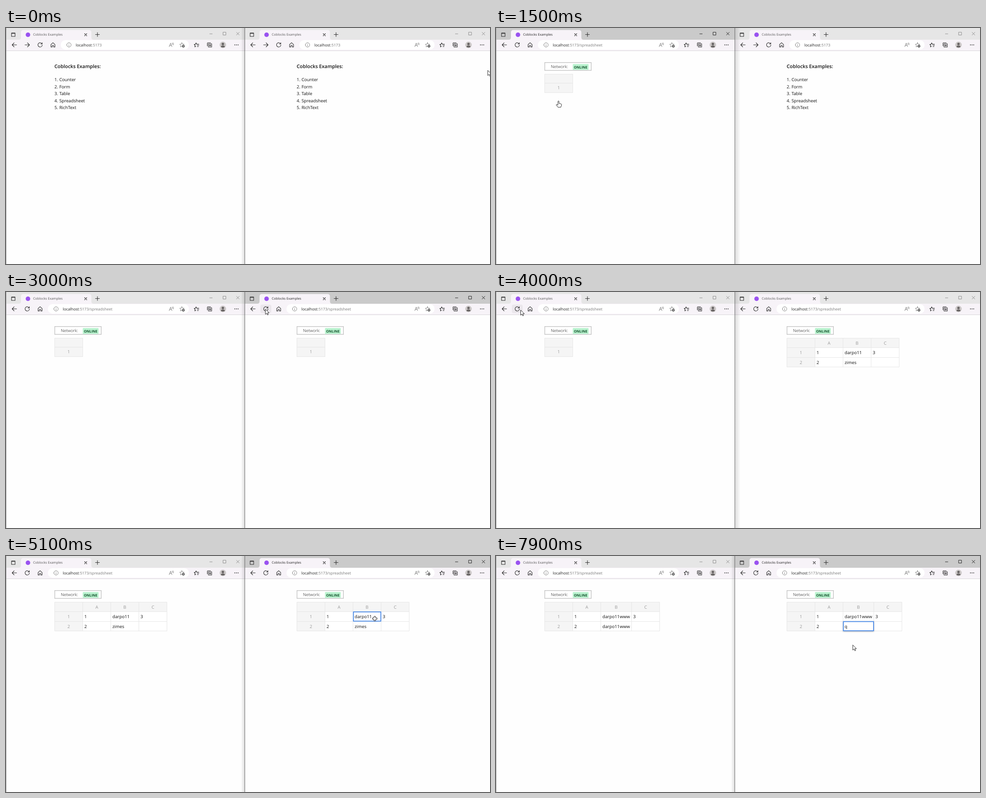
Animation of 1069x524 px, one loop 8 s. Source, as an HTML page:

```html
<!DOCTYPE html>
<html lang="en">
<head>
<meta charset="utf-8">
<title>Coblocks Examples</title>
<style>
html, body { margin: 0; width: 100%; height: 100%; overflow: hidden; background: #fefefe; }
svg { display: block; width: 1069px; height: 524px; }
text { font: 9.7px "Open Sans", "Noto Sans", sans-serif; fill: #111; text-rendering: geometricPrecision; white-space: pre; }
.bar { fill: #e6e6e6; }
.active .bar { fill: #cacaca; }
.ctl { fill: none; stroke: #858585; stroke-width: .9; }
.active .ctl { stroke: #111; }
.tab { fill: #f7f3f8; }
text.small { font-size: 7.3px; fill: #555; }
.active text.small { fill: #222; }
text.url { font-size: 8.5px; fill: #777; }
.url tspan { fill: #1c1c1c; }
text.title { font-size: 10.85px; font-weight: 600; }
text.net { font-size: 9.4px; font-weight: 300; }
text.badge { font-size: 7.7px; font-weight: 700; fill: #14532d; }
text.head { fill: #999; text-anchor: middle; }
.icon { fill: none; stroke: #2b2b2b; stroke-width: 1.1; stroke-linecap: round; stroke-linejoin: round; }
.soft { stroke: #777; stroke-width: .9; }
.grid { fill: none; stroke: #e6e6e6; }
.pick { fill: none; stroke: #3c82e6; stroke-width: 1.7; }
.edit { fill: #fff; filter: drop-shadow(0 1px 1.5px rgba(0,0,0,.35)); }
.caret { fill: #111; }
.pointer { fill: #fff; stroke: #111; stroke-width: .9; stroke-linejoin: round; }
</style>
</head>
<body>
<svg id="stage" viewBox="0 0 1069 524"></svg>
<script>
const LOOP = 8000;
const USER = 'darpo11', LONG = USER + 'www', OTHER = 'zimes';
const stage = document.getElementById('stage');

// "a-b c-d" lists the spans of time in ms during which a group shows
const show = (spans, body) => `<g data-on="${spans}">${body}</g>`;
const move = (x, y, body) => `<g transform="translate(${x} ${y})">${body}</g>`;
const path = (d, cls = 'icon') => `<path class="${cls}" d="${d}"/>`;
const box = (x, y, w, h, more = '') => `<rect x="${x}" y="${y}" width="${w}" height="${h}" ${more}/>`;
const text = (x, y, s, cls = '') => `<text x="${x}" y="${y}" class="${cls}">${s}</text>`;

const STAR = 'M0 -5L1.5 -1.7L5 -1.3L2.4 1.1L3.1 4.6L0 2.8L-3.1 4.6L-2.4 1.1L-5 -1.3L-1.5 -1.7Z';
const icons = {
  back: path('M5 0H-5M-.5 -4.5L-5 0L-.5 4.5'),
  forward: path('M-5 0H5M.5 -4.5L5 0L.5 4.5'),
  reload: path('M4.3 -2.2A4.8 4.8 0 1 0 4.8 .4M4.6 -5V-2H1.6'),
  home: path('M-4.4 -.8L0 -4.8L4.4 -.8V4.6H1.5V1.2H-1.5V4.6H-4.4Z'),
  info: path('M-4.8 0A4.8 4.8 0 1 0 4.8 0A4.8 4.8 0 1 0 -4.8 0M0 -.3V2.4M0 -2.3V-2.2', 'icon soft'),
  read: path('M-4.6 4L-1.5 -4L1.6 4M-3.5 1.2H.5M2 -4Q3.2 -2.5 2.4 -.8M4 -4.8Q6 -2.4 4.6 .2', 'icon soft'),
  addStar: path(STAR, 'icon soft') + '<circle cx="3.2" cy="2.8" r="2.9" fill="#444"/>' +
    '<path d="M1.5 2.8H4.9M3.2 1.1V4.5" stroke="#fff" stroke-width=".8"/>',
  favorites: path('M-1.8 3.2L-4 4.4L-3.4 1L-5.4 -1L-2.7 -1.4L-1.2 -4.4L.3 -1.4H5M1.5 1.2H5M1.5 3.8H4'),
  collect: path('M-2.5 -2.5H4.8V4.8H-2.5ZM-4.8 2.2V-3.6Q-4.8 -4.8 -3.6 -4.8H2.4M1.2 -.9V3.2M-.9 1.1H3.2'),
  avatar: '<circle r="7.2" fill="#cdc9c9"/><circle cy="-2" r="2.7" fill="#696565"/>' +
    '<path d="M-4.4 4.7Q-4.4 1.3 0 1.3T4.4 4.7Q0 7 -4.4 4.7Z" fill="#696565"/>',
  more: [-3.6, 0, 3.6].map(x => `<circle cx="${x}" r=".95" fill="#222"/>`).join('')
};
const icon = (name, x) => move(x, 37.5, icons[name]);

const HOST = '<tspan>localhost</tspan>:5173';

// l shifts the left-aligned parts, r the right-aligned ones, p the page
function browser({ l, r, p, width, active, open, hover, load, page }) {
  const address = (x, url) =>
    box(l + x - 18, 27, 301 + r - l - (x - 121), 21, 'rx="10" fill="#fff"') +
    icon('info', l + x) + text(l + x + 15, 40.6, url, 'url');
  const items = ['Counter', 'Form', 'Table', 'Spreadsheet', 'RichText'];
  const home = ['back', 'forward', 'reload', 'home'].map((n, i) => icon(n, l + 18.5 + i * 28.4)).join('') +
    address(139, HOST) +
    text(p + 107, 89, 'Coblocks Examples:', 'title') +
    items.map((s, i) => text(p + 107, 118.2 + i * 15.5, `${i + 1}. ${s}`)).join('');
  const sheet = show(hover, box(l + 35, 28, 24, 19, 'rx="4" fill="#ebe7ec"')) +
    ['back', 'reload', 'home'].map((n, i) => icon(n, l + 18.5 + i * 28.4)).join('') +
    address(110.5, HOST + '/spreadsheet') +
    box(p + 107.7, 76.7, 102.6, 17.4, 'fill="#fff" stroke="#c2c2c2" stroke-width="1.4"') +
    text(p + 121, 89, 'Network:', 'net') +
    box(p + 169.5, 80, 35, 13, 'rx="1.5" fill="#bbf3d0"') + text(p + 172, 89.6, 'ONLINE', 'badge') +
    show(`${open}-${load}`, move(p, 0,
      box(107.5, 102.5, 62, 41, 'fill="#f5f5f5" stroke="#e6e6e6"') +
      path('M107.5 122.5H169.5', 'grid') + text(138.5, 136.3, 1, 'head'))) +
    show(`${load}-${LOOP}`, move(p, 0, page));
  const tabs = path(`M28 26q5 0 5 -5V10q0 -5.5 5.5 -5.5H183q5.5 0 5.5 5.5V21q0 5 5 5Z`, 'tab') +
    path('M12.2 11H20V18.8H12.2ZM12.2 12H20') +
    '<circle cx="48.5" cy="15" r="5" fill="#9a52f0"/>' +
    text(60, 17.4, 'Coblocks Examples', 'small') +
    path('M173.5 12.5L178.5 17.5M178.5 12.5L173.5 17.5') + path('M197.5 14.5H206.5M202 10V19');
  return `<g data-active="${active}">` +
    box(l, 0, width, 26, 'class="bar"') +
    move(r, 0, path('M449.5 13H456M479.3 9.3H485.7V15.7H479.3ZM508.7 9.2L515.5 16M515.5 9.2L508.7 16', 'ctl')) +
    box(l, 26, width, 24, 'class="tab"') + box(l, 50, width, 1, 'fill="#d9d5da"') +
    move(l, 0, tabs) +
    show(`0-${open}`, home) + show(`${open}-${LOOP}`, sheet) +
    [['read', 365], ['addStar', 388.5], ['favorites', 421], ['collect', 449.5], ['avatar', 479], ['more', 509]]
      .map(([n, x]) => icon(n, r + x)).join('') + '</g>';
}

// the grid with column B of width b
function grid(b) {
  const x = [107.5, 169.5, 231.5, 231.5 + b, 293.5 + b], y = [102.5, 123.5, 145.5, 166.5], end = x[4];
  return box(107.5, 102.5, end - 107.5, 64, 'fill="#fff"') +
    box(107.5, 102.5, end - 107.5, 21, 'fill="#f5f5f5"') + box(107.5, 102.5, 62, 64, 'fill="#f5f5f5"') +
    path(x.map(v => `M${v} 102.5V166.5`).join('') + y.map(v => `M107.5 ${v}H${end}`).join(''), 'grid') +
    [...'ABC'].map((c, i) => text((x[i + 1] + (x[i + 2] || end)) / 2, 117, c, 'head')).join('') +
    [1, 2].map(n => text(138.5, 117 + n * 21.3, n, 'head') + text(173, 117 + n * 21.3, n)).join('') +
    text(x[3] + 3.5, 138.3, 3);
}
const cellB = (row, s) => text(235, 117 + row * 21.3, s);
const pick = (row, w) => box(232.3, 102.8 + row * 21.4, w - 1.4, 20.4, 'class="pick"');
const edit = (row, w) => box(231.5, 102 + row * 21.4, w, 22, 'class="edit"') + pick(row, w);
const caret = (x, y) => box(x, y, 1, 14, 'class="caret"');

const leftPage =
  show('0-6200', grid(62) + cellB(1, USER)) +
  show('6200-8000', grid(68) + cellB(1, LONG)) +
  show('0-7000', cellB(2, OTHER)) + show('7000-8000', cellB(2, LONG));

const rightPage =
  show('0-6100', grid(62)) + show('6100-8000', grid(68)) +
  show('5000-5300', pick(1, 62)) + show('5300-6100', edit(1, 62)) +
  show('0-5600', cellB(1, USER)) + show('5600-5800', cellB(1, USER + 'w')) +
  show('5800-5900', cellB(1, USER + 'ww')) + show('5900-8000', cellB(1, LONG)) +
  show('5300-5600', caret(274, 127)) + show('5600-5800', caret(281.5, 127)) +
  show('0-6900', cellB(2, OTHER)) + show('6900-7200', cellB(2, LONG)) +
  show('6100-7200', pick(2, 68)) + show('7200-8000', edit(2, 68) + cellB(2, 'q')) +
  show('7400-7900', caret(242, 148));

const pointers = {
  arrow: path('M0 0V11.5L2.7 9L4.6 13L6.4 12.2L4.6 8.3H8.2Z', 'pointer'),
  hand: path('M-1.2 1.2a1.2 1.2 0 0 1 2.4 0V5.5l4.2 .9q1.6 .4 1.4 2L6 11.5L5 14H-1L-4.8 9.3q-.6 -1.4 1 -1.5L-1.2 9.2Z', 'pointer'),
  cross: path('M-1.7 -5H1.7V-1.7H5V1.7H1.7V5H-1.7V1.7H-5V-1.7H-1.7Z', 'pointer'),
  beam: path('M-2 -6.5H2M0 -6.5V6.5M-2 6.5H2', 'pointer'),
  none: ''
};
// pointer track: start in tenths of a second, shape, x, y
const track = [
  [0, 'arrow', 1064, 94], [1, 'arrow', 986, 140], [2, 'arrow', 946, 156], [3, 'arrow', 871, 184],
  [4, 'arrow', 741, 192], [5, 'arrow', 616, 185], [6, 'arrow', 316, 183], [7, 'arrow', 183, 177],
  [8, 'hand', 138, 162], [16, 'arrow', 135, 163], [17, 'arrow', 183, 170], [18, 'arrow', 443, 166],
  [19, 'arrow', 713, 168], [20, 'hand', 684, 159], [25, 'arrow', 682, 160], [26, 'arrow', 660, 176],
  [27, 'arrow', 630, 82], [28, 'arrow', 590, 52], [29, 'arrow', 573, 38], [35, 'arrow', 560, 55],
  [36, 'arrow', 292, 88], [37, 'arrow', 72, 70], [38, 'arrow', 58, 62], [39, 'arrow', 54.5, 40],
  [45, 'arrow', 120, 62], [46, 'arrow', 486, 131], [47, 'arrow', 848, 176], [48, 'cross', 814.5, 139],
  [53, 'none', 0, 0], [63, 'cross', 810, 157], [72, 'beam', 811, 157], [79, 'arrow', 788, 197.5]
];

const fade = (id, x1, x2) => `<linearGradient id="${id}" x1="${x1}" x2="${x2}">` +
  '<stop stop-opacity=".13"/><stop offset="1" stop-opacity="0"/></linearGradient>';

stage.innerHTML = '<defs>' + fade('toLeft', 1, 0) + fade('toRight', 0, 1) + '</defs>' +
  box(0, 0, 1069, 524, 'fill="#fefefe"') +
  browser({ l: 0, r: 0, p: 0, width: 528, active: '1300-2300 4100-4900',
    open: 1400, hover: '4000-4500', load: 4300, page: leftPage }) +
  browser({ l: 527, r: 542.5, p: 535, width: 542, active: '2300-4000 4900-8000',
    open: 2400, hover: '2900-3500', load: 3300, page: rightPage }) +
  show('1000-1400', box(-.5, 511.5, 102.5, 14, 'fill="#e9e9e9" stroke="#d2d2d2"') +
    text(4, 521.4, 'localhost:5173/spreadsheet', 'small')) +
  show('0-1300 2300-4000 4900-8000', box(519, 0, 8, 524, 'fill="url(#toLeft)"')) +
  show('1300-2300 4000-4900', box(528, 0, 12, 524, 'fill="url(#toRight)"')) +
  box(0, 0, 1, 524, 'fill="#a8a8a8"') + box(527, 0, 1, 524, 'fill="#6a6a6a"') +
  '<g id="pointer"></g>';

const timed = key => [...stage.querySelectorAll(`[data-${key}]`)].map(el =>
  ({ el, spans: el.dataset[key].split(' ').map(s => s.split('-').map(Number)) }));
const shown = timed('on'), windows = timed('active');
const pointer = document.getElementById('pointer');
const within = (spans, t) => spans.some(([a, b]) => t >= a && t < b);
let shape;

function render(t) {
  for (const { el, spans } of shown) el.style.display = within(spans, t) ? '' : 'none';
  for (const { el, spans } of windows) el.classList.toggle('active', within(spans, t));
  const [, kind, x, y] = track.filter(k => k[0] * 100 <= t).pop();
  if (kind !== shape) pointer.innerHTML = pointers[shape = kind];
  pointer.setAttribute('transform', `translate(${x} ${y})`);
}

const start = performance.now();
function tick() {
  render((performance.now() - start) % LOOP);
  requestAnimationFrame(tick);
}
tick();
</script>
</body>
</html>
```
